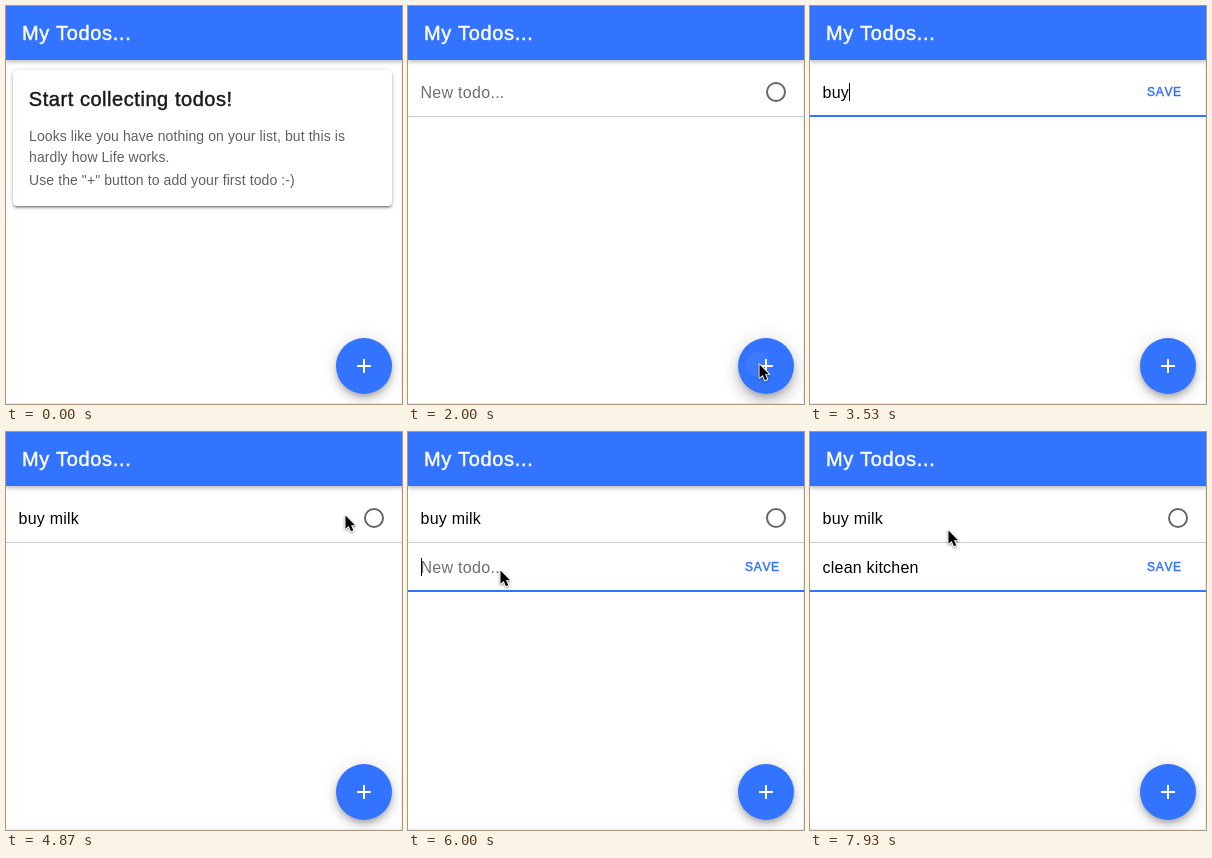
Animation, 396 px wide and 398 px high, one loop 8000 ms. Source, as an HTML page:

```html
<!DOCTYPE html>
<html lang="en">
<head>
<meta charset="utf-8">
<title>My Todos</title>
<style>
  :root { --blue: #3273ff; }
  html, body { margin: 0; width: 100%; height: 100%; overflow: hidden; background: #fff; }
  #stage { position: relative; width: 396px; height: 398px; overflow: hidden; background: #fff; }
  #stage > * { position: absolute; }
  #edge { inset: 0; box-sizing: border-box; border: solid #ececec; border-width: 0 1px 1px 0; }
  #bar { left: 0; top: 0; width: 396px; height: 54px; background: var(--blue);
    box-shadow: 0 2px 4px rgba(0,0,0,.28); }
  #card { left: 7px; top: 64px; width: 379px; height: 136px; border-radius: 4px; background: #fff;
    box-shadow: 0 3px 1px -2px rgba(0,0,0,.2), 0 2px 2px rgba(0,0,0,.24), 0 1px 5px rgba(0,0,0,.2); }
  /* --heat goes from 0 at rest to 1 while pressed and lifts the button. */
  #fab { --heat: 0; left: 330px; top: 332px; width: 56px; height: 56px; border-radius: 50%;
    background: var(--blue); box-shadow:
    0 calc(3px + 4px * var(--heat)) calc(5px + 3px * var(--heat)) calc(-1px - 3px * var(--heat)) rgba(0,0,0,.2),
    0 calc(6px + 6px * var(--heat)) calc(10px + 7px * var(--heat)) calc(2px * var(--heat)) rgba(0,0,0,.14),
    0 calc(1px + 4px * var(--heat)) calc(18px + 4px * var(--heat)) calc(4px * var(--heat)) rgba(0,0,0,.12); }
  svg { left: 0; top: 0; }
  text { font-family: "Liberation Sans", Arial, sans-serif; white-space: pre; }
  .head { font-size: 20px; letter-spacing: .55px; stroke-width: .45px; }
  .title { letter-spacing: .7px; fill: #fff; stroke: #fff; }
  .body { font-size: 14px; letter-spacing: .09px; fill: #606060; }
  .item { font-size: 16px; letter-spacing: .2px; }
  .hint { font-size: 16px; letter-spacing: .3px; fill: #707070; }
  .save { font-size: 12px; letter-spacing: .7px; font-kerning: none; fill: var(--blue);
    stroke: var(--blue); stroke-width: .45px; }
</style>
</head>
<body>
<div id="stage">
  <div id="edge"></div>
  <div id="bar"></div>
  <div id="card"></div>
  <div id="fab"></div>
  <svg width="396" height="398" viewBox="0 0 396 398">
    <defs>
      <clipPath id="disc"><circle cx="358" cy="360" r="28"/></clipPath>
      <path id="arrow" d="M0 0V14.5L3.4 11.4L6 17.2L8.5 16.1L6 10.5H10.4Z"/>
    </defs>
    <text class="head title" x="16" y="34">My Todos...</text>
    <g id="intro">
      <text class="head" x="22.8" y="100" fill="#1a1a1a" stroke="#1a1a1a">Start collecting todos!</text>
      <text class="body" x="23" y="135">Looks like you have nothing on your list, but this is</text>
      <text class="body" x="23" y="156">hardly how Life works.</text>
      <text class="body" x="23" y="179">Use the "+" button to add your first todo :-)</text>
    </g>
    <g id="rows"></g>
    <g clip-path="url(#disc)"><circle id="ripple" cx="350" cy="358" fill="#fff"/></g>
    <path d="M358 353v14M351 360h14" stroke="#fff" stroke-width="2"/>
    <g id="pointer">
      <use href="#arrow" stroke="#fff" stroke-width="2" stroke-linejoin="round"
        style="filter:drop-shadow(0 1px 1px rgba(0,0,0,.45))"/>
      <use href="#arrow"/>
    </g>
  </svg>
</div>
<script>
const LOOP = 8000;
const $ = id => document.getElementById(id);
const clamp = v => Math.min(1, Math.max(0, v));
const ease = u => u * u * (3 - 2 * u);
const show = (el, on) => el.style.display = on ? '' : 'none';

// Each burst of typing spreads its letters evenly from first key to last.
const todos = [
  { born: 2000, focus: 2670, saved: 4670, bursts: [
    { text: 'bu', from: 3130, to: 3270 },
    { text: 'y ', from: 3530, to: 3600 },
    { text: 'milk', from: 3800, to: 4130 } ] },
  { born: 5400, focus: 5870, saved: Infinity, bursts: [
    { text: 'clean ', from: 6270, to: 6730 },
    { text: 'ki', from: 7000, to: 7130 },
    { text: 'tchen', from: 7270, to: 7600 } ] }
];

// The pointer enters at the bottom, then eases from one stop to the next.
const entry = { x: 328, y: 391 };
const glides = [
  { from: 1400, to: 1730, x: 351, y: 358 },
  { from: 2000, to: 2530, x: 95, y: 90 },
  { from: 4400, to: 4670, x: 339, y: 83 },
  { from: 4870, to: 5300, x: 357, y: 348 },
  { from: 5330, to: 5840, x: 92, y: 138 },
  { from: 7930, to: 7930, x: 138, y: 98 }
];

$('rows').innerHTML = todos.map((r, i) => `
  <g transform="translate(0 ${i * 49})">
    <rect y="110" width="396" height="1" fill="#cbcbcb"/>
    <rect y="109" height="2" fill="var(--blue)"/>
    <text class="hint" x="12.4" y="92">New todo...</text>
    <text class="item" x="12.6" y="92" xml:space="preserve"></text>
    <rect y="77" width="1" height="18"/>
    <circle cx="368" cy="86" r="9" fill="none" stroke="#666" stroke-width="2"/>
    <text class="save" x="337" y="90">SAVE</text>
  </g>`).join('');

todos.forEach((r, i) => {
  r.el = $('rows').children[i];
  [, r.line, r.hint, r.label, r.caret, r.ring, r.save] = r.el.children;
});

function typedPart({ text, from, to }, t) {
  const gap = (to - from) / (text.length - 1);
  return text.slice(0, Math.max(0, Math.floor((t - from + 5) / gap) + 1));
}

function drawRow(r, t) {
  show(r.el, t >= r.born);
  const editing = t >= r.focus && t < r.saved;
  const typed = r.bursts.map(b => typedPart(b, t)).join('');
  if (r.label.textContent !== typed) r.label.textContent = typed;
  show(r.hint, !typed);
  show(r.save, editing);
  show(r.ring, !editing);

  // The underline grows from the click and fades after saving.
  const grow = clamp((t - r.focus + 60) / 180);
  r.line.setAttribute('x', 95 * (1 - grow));
  r.line.setAttribute('width', t >= r.focus ? 396 * grow : 0);
  r.line.style.opacity = 1 - clamp((t - r.saved) / 180);

  show(r.caret, editing && t < r.bursts.at(-1).to + 330);
  const end = typed ? r.label.getComputedTextLength() : 0;
  r.caret.setAttribute('x', Math.round(12.8 + end));
}

// A press starts just before its row appears and ends when the row is focused.
function drawButton(t) {
  const r = todos.findLast(r => t >= r.born - 40);
  const age = r ? t - r.born + 40 : 0;
  const heat = r ? clamp(age / 120) * (1 - clamp((t - r.focus) / 130)) : 0;
  $('fab').style.setProperty('--heat', heat);
  $('ripple').setAttribute('r', 2 + 52 * clamp(age / 200));
  $('ripple').style.opacity = .13 * heat;
}

// Typing hides the pointer until it next moves.
function drawPointer(t) {
  const i = glides.findLastIndex(g => t >= g.from);
  const g = glides[i];
  const typing = g && todos.some(r => r.bursts[0].from > g.from && r.bursts[0].from <= t);
  show($('pointer'), g && !typing);
  if (!g) return;
  const a = glides[i - 1] || entry;
  const u = ease(clamp((t - g.from + 1) / (g.to - g.from + 1)));
  const x = a.x + (g.x - a.x) * u, y = a.y + (g.y - a.y) * u;
  $('pointer').setAttribute('transform', `translate(${x + .5} ${y + .5}) scale(.92)`);
}

function draw(now) {
  // The picture advances fifteen times a second.
  const step = Math.floor((now % LOOP + 4) * 15 / 1000);
  const t = Math.round(step * 20 / 3) * 10 % LOOP;
  show($('card'), t < todos[0].born);
  show($('intro'), t < todos[0].born);
  todos.forEach(r => drawRow(r, t));
  drawButton(t);
  drawPointer(t);
}

let start;
function tick(now) {
  start ??= now;
  draw(now - start);
  requestAnimationFrame(tick);
}
draw(0);
requestAnimationFrame(tick);
</script>
</body>
</html>
```
